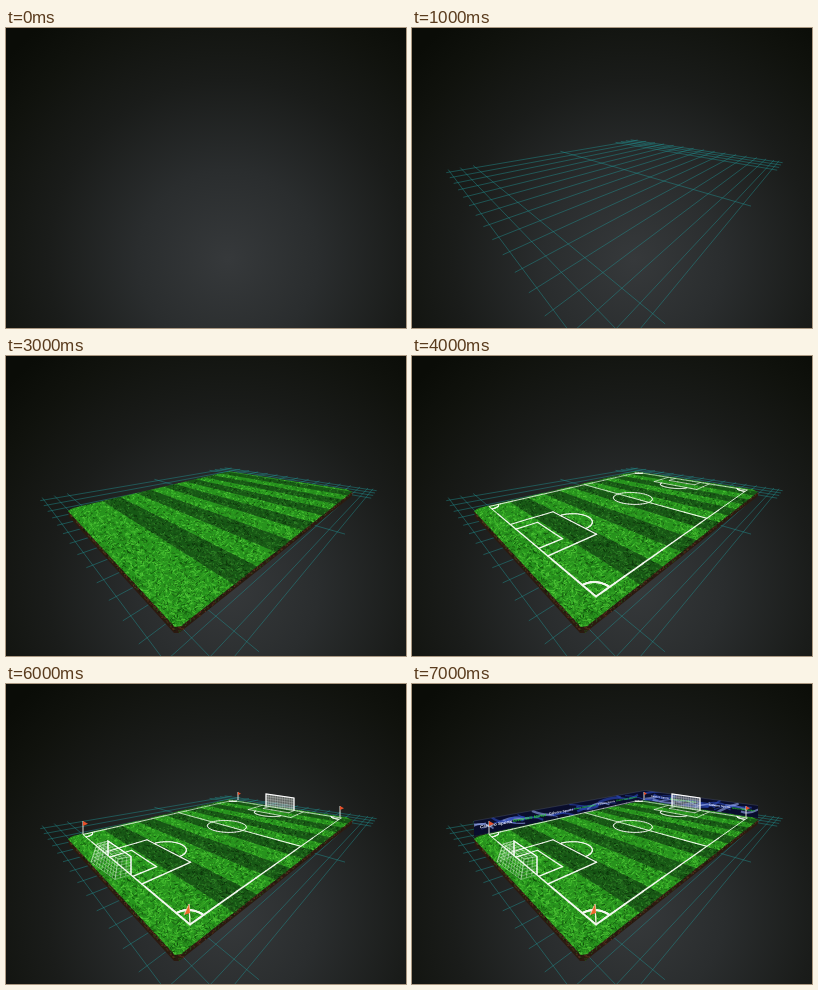
Write an HTML page with a canvas that moves like this. It is 400 px wide and 300 px high and loops after 8000 ms.

```html
<!DOCTYPE html>
<html lang="en">
<head>
<meta charset="utf-8">
<title>Pitch build-up</title>
<style>
html, body { margin: 0; width: 100%; height: 100%; overflow: hidden; background: #111; }
canvas { display: block; width: 400px; height: 300px; }
</style>
</head>
<body>
<canvas id="stage" width="400" height="300"></canvas>
<script>
const ctx = document.getElementById('stage').getContext('2d');
const STEP = 1000, STEPS = 8;

// Maps the unit square to a quad: (0,0) (1,0) (1,1) (0,1)
function plane([ax, ay], [bx, by], [cx, cy], [dx, dy]) {
  const x1 = bx - cx, y1 = by - cy, x2 = dx - cx, y2 = dy - cy;
  const sx = ax - bx + cx - dx, sy = ay - by + cy - dy;
  const den = x1 * y2 - x2 * y1;
  const g = (sx * y2 - x2 * sy) / den, h = (x1 * sy - sx * y1) / den;
  return (u, v) => {
    const w = g * u + h * v + 1;
    return [((bx - ax + g * bx) * u + (dx - ax + h * dx) * v + ax) / w,
            ((by - ay + g * by) * u + (dy - ay + h * dy) * v + ay) / w];
  };
}

const pitch = plane([77, 150.5], [226, 116.5], [335, 134], [184, 240.5]);
const guide = plane([38, 144], [223, 112.5], [366, 134], [190, 347]);
const TURF = [[62, 155], [67, 152], [216, 117], [224, 115.5], [341, 133.5], [346, 136], [175, 270], [169, 271]];

function trace(pts, close) {
  ctx.beginPath();
  pts.forEach(p => ctx.lineTo(p[0], p[1]));
  if (close) ctx.closePath();
}
function stroke(pts, color, width = 1) {
  trace(pts);
  ctx.strokeStyle = color;
  ctx.lineWidth = width;
  ctx.stroke();
}
function fill(pts, color) {
  trace(pts, true);
  ctx.fillStyle = color;
  ctx.fill();
}
function random(seed) {
  return () => (seed = (seed * 16807) % 2147483647) / 2147483647;
}
const mix = (p, q, t) => [p[0] + (q[0] - p[0]) * t, p[1] + (q[1] - p[1]) * t];

function backdrop() {
  const g = ctx.createRadialGradient(222, 232, 0, 222, 232, 300);
  g.addColorStop(0, '#36393b');
  g.addColorStop(0.3, '#2a2d2e');
  g.addColorStop(0.6, '#1a1c1a');
  g.addColorStop(0.85, '#10120d');
  g.addColorStop(1, '#0a0c07');
  ctx.fillStyle = g;
  ctx.fillRect(0, 0, 400, 300);
}

function guides() {
  const teal = 'rgba(32,145,145,.68)', rows = 15;
  for (let i = 0; i <= rows; i++) {
    const v = 1 - (1 - i / rows) ** 1.4;
    stroke([guide(-0.01, v), guide(1.03, v)], teal, 0.7);
  }
  for (const u of [0, 0.035, 0.075, 0.45, 0.85, 0.9, 0.95, 1])
    stroke([guide(u, -0.05), guide(u, 1.02)], teal, 0.7);
}

function stripes() {
  const count = 12;
  for (let i = -1; i <= count; i++) {
    const u = i / count, r = (i + 1) / count, dark = i > 0 && i % 2;
    ctx.globalCompositeOperation = dark ? 'multiply' : 'overlay';
    fill([pitch(u, -0.12), pitch(r, -0.12), pitch(r, 1.12), pitch(u, 1.12)],
      dark ? 'rgba(0,0,0,.22)' : 'rgba(255,255,170,.32)');
  }
}

function turf(striped) {
  const rnd = random(77);
  // Soil edge
  fill([[62, 155], [63, 161], [168, 277], [173, 277], [346, 140], [346, 136], [168, 262]], '#2c1a10');
  for (let i = 0; i < 500; i++) {
    const t = rnd(), left = rnd() < 0.5;
    const [x, y] = left ? mix([63, 157], [169, 272], t) : mix([346, 136], [172, 272], t);
    const depth = left ? 2 + 3 * t : 1.5 + 4 * t;
    ctx.fillStyle = ['#4a2a18', '#1b1a0c', '#27481a', '#5a3220'][i % 4];
    ctx.fillRect(x, y + rnd() * depth - 1, 1.2, 1.2);
  }
  ctx.save();
  trace(TURF, true);
  ctx.clip();
  ctx.fillStyle = '#1d701a';
  ctx.fillRect(0, 0, 400, 300);
  for (let i = 0; i < 13000; i++) {
    const x = 60 + rnd() * 290, y = 112 + rnd() * 162;
    const len = 1.2 + (y - 110) / 45, a = rnd() * 6.28, tone = rnd();
    stroke([[x, y], [x + Math.cos(a) * len, y + Math.sin(a) * len * 0.8]],
      `rgb(${10 + tone * 58 | 0},${56 + tone * 128 | 0},${9 + tone * 46 | 0})`, 0.9);
  }
  if (striped) stripes();
  ctx.restore();
}

function arc(u, v, ru, rv, from, to) {
  return Array.from({ length: 41 }, (_, i) => {
    const a = from + (to - from) * i / 40;
    return pitch(u + ru * Math.cos(a), v + rv * Math.sin(a));
  });
}

// White line that thins with distance
function chalk(pts) {
  ctx.lineCap = 'round';
  for (let i = 1; i < pts.length; i++) {
    const [p, q] = [pts[i - 1], pts[i]];
    const parts = Math.ceil(Math.hypot(q[0] - p[0], q[1] - p[1]) / 12);
    for (let k = 0; k < parts; k++) {
      const a = mix(p, q, k / parts), b = mix(p, q, (k + 1) / parts);
      stroke([a, b], '#f4f8f0', (a[1] + b[1]) / 160 - 0.95);
    }
  }
  ctx.lineCap = 'butt';
}

function markings() {
  const P = Math.PI, mid = 0.547;
  chalk([pitch(0, 0), pitch(1, 0), pitch(1, 1), pitch(0, 1), pitch(0, 0)]);
  chalk([pitch(0.505, 0), pitch(0.505, 1)]);
  chalk(arc(0.505, 0.52, 0.086, 0.13, 0, 2 * P));
  for (const end of [0, 1]) {
    const at = d => end ? 1 - d : d;
    for (const [d, half] of [[0.16, 0.187], [0.073, 0.115]])
      chalk([pitch(end, mid - half), pitch(at(d), mid - half), pitch(at(d), mid + half), pitch(end, mid + half)]);
    const turn = end ? P : 0;
    chalk(arc(at(0.16), mid, 0.065, 0.11, turn - P / 2, turn + P / 2));
    for (const v of [0, 1]) {
      const start = end ? (v ? P : P / 2) : (v ? -P / 2 : 0);
      chalk(arc(end, v, 0.035, 0.06, start, start + P / 2));
    }
  }
}

function net(a, b, c, d, cols, rows, color) {
  for (let i = 0; i <= cols; i++) stroke([mix(a, b, i / cols), mix(d, c, i / cols)], color, 0.6);
  for (let j = 0; j <= rows; j++) stroke([mix(a, d, j / rows), mix(b, c, j / rows)], color, 0.6);
}

function goals() {
  const mesh = 'rgba(240,248,240,.55)';
  // Near goal
  const t1 = [102, 157], t2 = [125, 172.5], f1 = [102, 171.5], f2 = [125, 190.5];
  const r1 = [91, 160], r2 = [112, 175], g1 = [85, 178], g2 = [109, 195.5];
  net(t1, t2, r2, r1, 9, 3, mesh);
  net(r1, r2, g2, g1, 9, 6, mesh);
  net(t1, r1, g1, f1, 3, 5, mesh);
  net(t2, r2, g2, f2, 3, 6, mesh);
  stroke([f1, t1, t2, f2], '#fff', 1.4);
  // Far goal
  const a = [260, 110], b = [288, 114], c = [288, 126.5], d = [260, 122.5];
  fill([a, b, c, d], 'rgba(200,210,200,.35)');
  net(a, b, c, d, 12, 5, 'rgba(235,240,235,.45)');
  stroke([d, a, b, c], '#fff', 1.2);
}

function flags() {
  for (const [x, top, foot, w] of [[77, 137, 150, 5], [232, 108, 116, 3], [334, 122, 133.5, 4]]) {
    stroke([[x, foot], [x, top]], '#f2f2e8', 0.9);
    fill([[x, top], [x + w, top + w * 0.55], [x, top + w]], '#e8502a');
  }
  stroke([[184, 240], [183, 220]], '#f4f0e0', 1.3);
  fill([[183, 220], [178, 231], [184, 229]], '#ee6a2c');
  stroke([[182, 222], [178, 231]], '#f8dfc0', 0.8);
}

// One banner: [x, top, foot] at each end; labels are [text, x, size, color]
function banner([x1, top1, foot1], [x2, top2, foot2], labels, seed) {
  const quad = [[x1, top1], [x2, top2], [x2, foot2], [x1, foot1]];
  const rnd = random(seed), slope = (top2 - top1) / (x2 - x1);
  ctx.save();
  trace(quad, true);
  ctx.clip();
  ctx.fillStyle = '#090d2c';
  ctx.fillRect(x1, 100, x2 - x1, 60);
  for (let i = 0; i < 24; i++) {
    const [x, y] = mix([x1, top1], [x2, top2], rnd());
    ctx.beginPath();
    ctx.moveTo(x - 10, y + 12 * rnd());
    ctx.quadraticCurveTo(x, y + 12 * rnd(), x + 12, y + 10 * rnd());
    ctx.strokeStyle = i % 3 ? 'rgba(45,75,190,.6)' : 'rgba(150,170,240,.6)';
    ctx.lineWidth = 0.6 + rnd() * 2;
    ctx.stroke();
  }
  ctx.textBaseline = 'middle';
  for (const [text, x, size, color] of labels) {
    const t = (x - x1) / (x2 - x1);
    const y = (top1 + foot1) / 2 * (1 - t) + (top2 + foot2) / 2 * t;
    ctx.save();
    ctx.transform(1, slope, 0, 1, x, y);
    ctx.font = `bold ${size}px "Liberation Sans", sans-serif`;
    ctx.fillStyle = color;
    ctx.fillText(text, 0, 0);
    ctx.restore();
  }
  ctx.restore();
  stroke([quad[0], quad[1]], 'rgba(110,120,150,.5)', 0.5);
}

function banners() {
  const W = '#eef2ff', G = '#25e02c', name = 'Calvoro Sports', slogan = 'Green Vale Market';
  banner([62, 137, 152], [233, 106.5, 116], [
    [name, 68, 4.5, W], [slogan, 101, 3.8, G], [name, 137, 3.4, W],
    [slogan, 162, 2.5, G], [name, 186, 2.4, W], [slogan, 204, 2.4, G]
  ], 31);
  banner([233, 106.5, 116], [346, 121.5, 134], [
    [name, 239, 2.5, W], [slogan, 258, 3, G], [name, 297, 3, W], [slogan, 320, 2.6, G]
  ], 58);
}

function draw(step) {
  backdrop();
  if (step >= 1) guides();
  if (step >= 2) turf(step >= 3);
  if (step >= 7) banners();
  if (step >= 4) markings();
  if (step >= 5) goals();
  if (step >= 6) flags();
}

let shown = -1;
const start = performance.now();
function tick() {
  const step = Math.floor((performance.now() - start) / STEP) % STEPS;
  if (step !== shown) draw(shown = step);
  requestAnimationFrame(tick);
}
tick();
</script>
</body>
</html>
```
